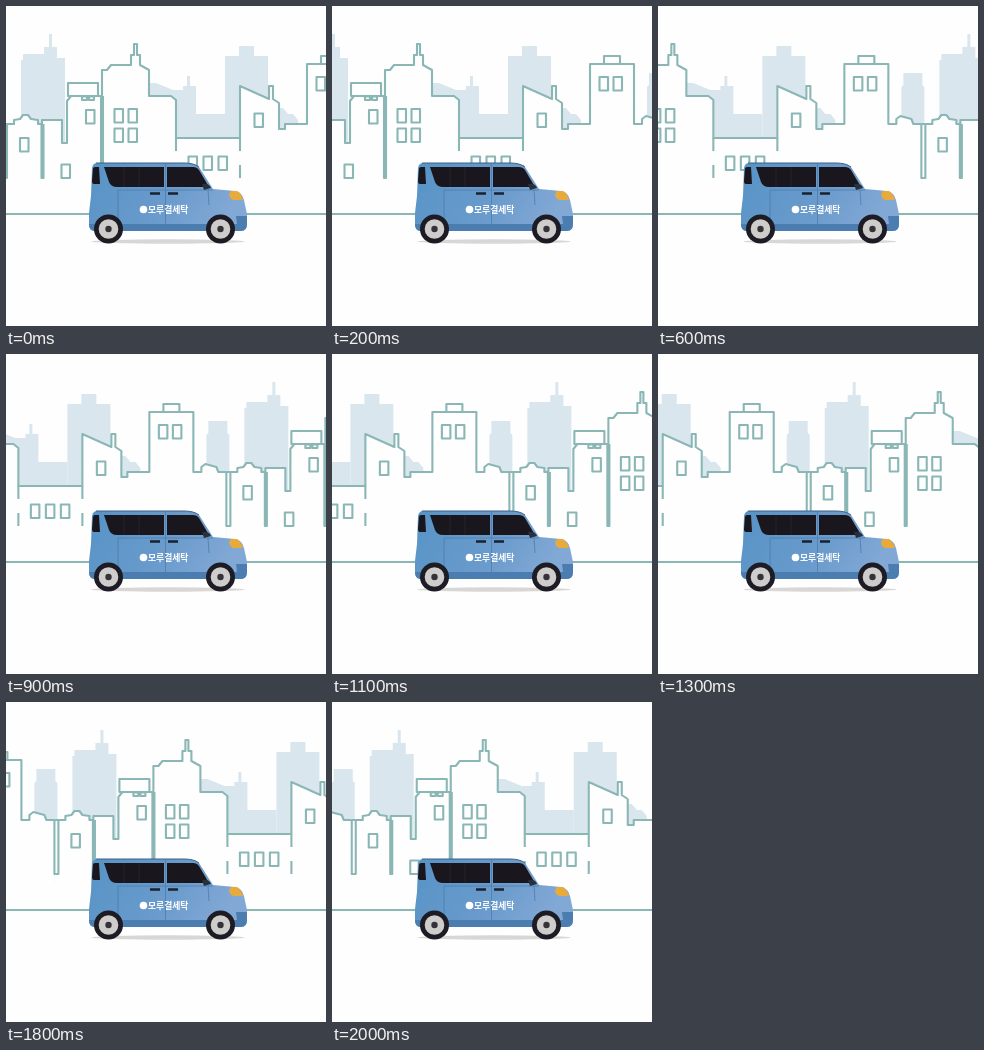
An HTML page for the animation above (2.1 s loop, 320 px wide and 320 px high).

```html
<!DOCTYPE html>
<html lang="ko">
<head>
<meta charset="utf-8">
<title>세탁 배달차</title>
<style>
  html, body { margin: 0; width: 100%; height: 100%; overflow: hidden; background: #fefefe; }
  svg { display: block; width: 100vw; height: 100vh; }
  .line { fill: none; stroke: #8ab7b6; stroke-width: 2.1; stroke-linejoin: round; }
  .far { fill: #dae6ee; }
  .glass { fill: #19171d; }
  .seam { fill: none; stroke: #4d7dab; stroke-width: .8; }
  text { font: 700 8.8px "Noto Sans CJK KR", "Noto Sans CJK", "Noto Sans CJK JP", sans-serif; fill: #fff; }
</style>
</head>
<body>
<svg viewBox="0 0 320 320">
  <defs>
    <linearGradient id="paint" x1="0" x2="1" y1="0" y2=".25">
      <stop offset="0" stop-color="#5793c6"/>
      <stop offset=".6" stop-color="#6a9bcc"/>
      <stop offset="1" stop-color="#82a8d5"/>
    </linearGradient>

    <g id="far" class="far">
      <path d="M15 180V54H17V48H38V41H43V28H46V41H51V52H59V180Z"/>
      <path d="M143 180V77H150L167 84H177V80H181V70H184V80H190V108H219V180Z"/>
      <path d="M219 180V50H233V40H248V50H262V180Z"/>
      <path d="M271 180V102H277L282 108H287L292 114V180Z"/>
      <path d="M358 180V81L360 79V67H379V79L381 81V180Z"/>
    </g>

    <g id="near">
      <path id="mass" fill="#fefefe"/>
      <path id="skyline" class="line" d="M-3 118H8V114L14 113L17 109H22L25 113L32 114V118H36
        V114H56V137H61V95L65 90H62V77H92V90H96V64H101L105 59H125V49H128V38H131V49H134V59L143 64V90
        H165L170 94V132H234V80L263 93V80H267V93L273 97V123H279V118H301V58H345V118
        H353V113L357 110L368 113L370 118H378"/>
      <path class="line" d="M-3 118V172H1V118M35.500 118V172H37.500V118M95 90V172H97V90M62 90H95
        M170 132V145M170 159V172M234 132V145M234 159V172M76 90.500H81V94H76ZM83 90.500H88V94H83ZM315 58V50H331V58"/>
      <g id="panes" class="line"></g>
    </g>
  </defs>

  <g id="city">
    <use href="#far" x="-381"/><use href="#far"/><use href="#far" x="381"/>
    <use href="#near" x="-381"/><use href="#near"/><use href="#near" x="381"/>
  </g>

  <path class="line" d="M0 208H320"/>

  <g id="van">
    <ellipse cx="162" cy="235.500" rx="77" ry="2.200" fill="#d9d7d6"/>
    <path fill="url(#paint)" d="M91 157H178Q188 157 193 161L207 183L229 185Q236 186 238 194L241 208V218
      Q241 225 235 225H88Q83 224 83 218V207L85 190L86 162Q87 157 91 157Z"/>
    <path d="M90 157H178Q188 157 193 161" fill="none" stroke="#3e5f85" stroke-width="1"/>
    <path d="M83 218H241Q241 225 235 225H88Q83 224 83 218Z" fill="#4c7db0"/>
    <path d="M230 210H241V218H231Z" fill="#4c7db0"/>
    <path class="glass" d="M89 161H93L94 178H88Q86 178 86 175L87 163Q87 161 89 161Z"/>
    <path class="glass" d="M98 161H158V181H111Q105 181 103 176Z"/>
    <path class="glass" d="M161 161H187Q191 161 193 164L203 181H161Z"/>
    <path d="M118 161V181M133 161V181" stroke="#2b282f" stroke-width=".8"/>
    <path class="seam" d="M112 184V218M159.500 157V218M112 184H207M202 184L203 199"/>
    <path d="M144 187.500H154M162 187.500H172" stroke="#1a2230" stroke-width="2.600"/>
    <path d="M196 178Q203 177 205 182L198 184Z" fill="#28303c"/>
    <path d="M225 185H231Q235 187 237 194H227Q223 192 223 188Z" fill="#e6aa3d"/>
    <g id="wheel">
      <circle cx="102.500" cy="223" r="14.500" fill="#1d1b23"/>
      <circle cx="102.500" cy="223" r="9.800" fill="#cfcdcc"/>
      <circle cx="102.500" cy="223" r="3.200" fill="#35323a"/>
    </g>
    <use href="#wheel" x="112"/>
    <circle cx="137.500" cy="203.500" r="3.800" fill="#fff"/>
    <text x="142" y="207">모루결세탁</text>
  </g>
</svg>
<script>
  const byId = id => document.getElementById(id);
  const LOOP = 2100, TICK = 100, STEP = 14.33;

  byId('mass').setAttribute('d', byId('skyline').getAttribute('d') + 'V190H-3Z');

  // Each row: top edge, then the left edges of its windows.
  const rows = [
    [132, 14], [158.5, 55.5], [104, 80], [103, 108.5, 122.5], [122.5, 108.5, 122.5],
    [150.5, 182.5, 197.5, 212.5], [107.5, 248.5], [71, 310.5, 324.5]
  ];
  byId('panes').innerHTML = rows.map(([y, ...xs]) =>
    xs.map(x => `<rect x="${x}" y="${y}" width="8.5" height="13.5"/>`).join('')).join('');

  const city = byId('city');
  function draw(now) {
    const tick = Math.floor(now % LOOP / TICK);
    // The scenery advances in 80 ms units, shown every 100 ms.
    const shift = Math.round(tick * TICK / 80) * STEP;
    city.setAttribute('transform', `translate(${-shift} 0)`);
    requestAnimationFrame(draw);
  }
  draw(0);
</script>
</body>
</html>
```
